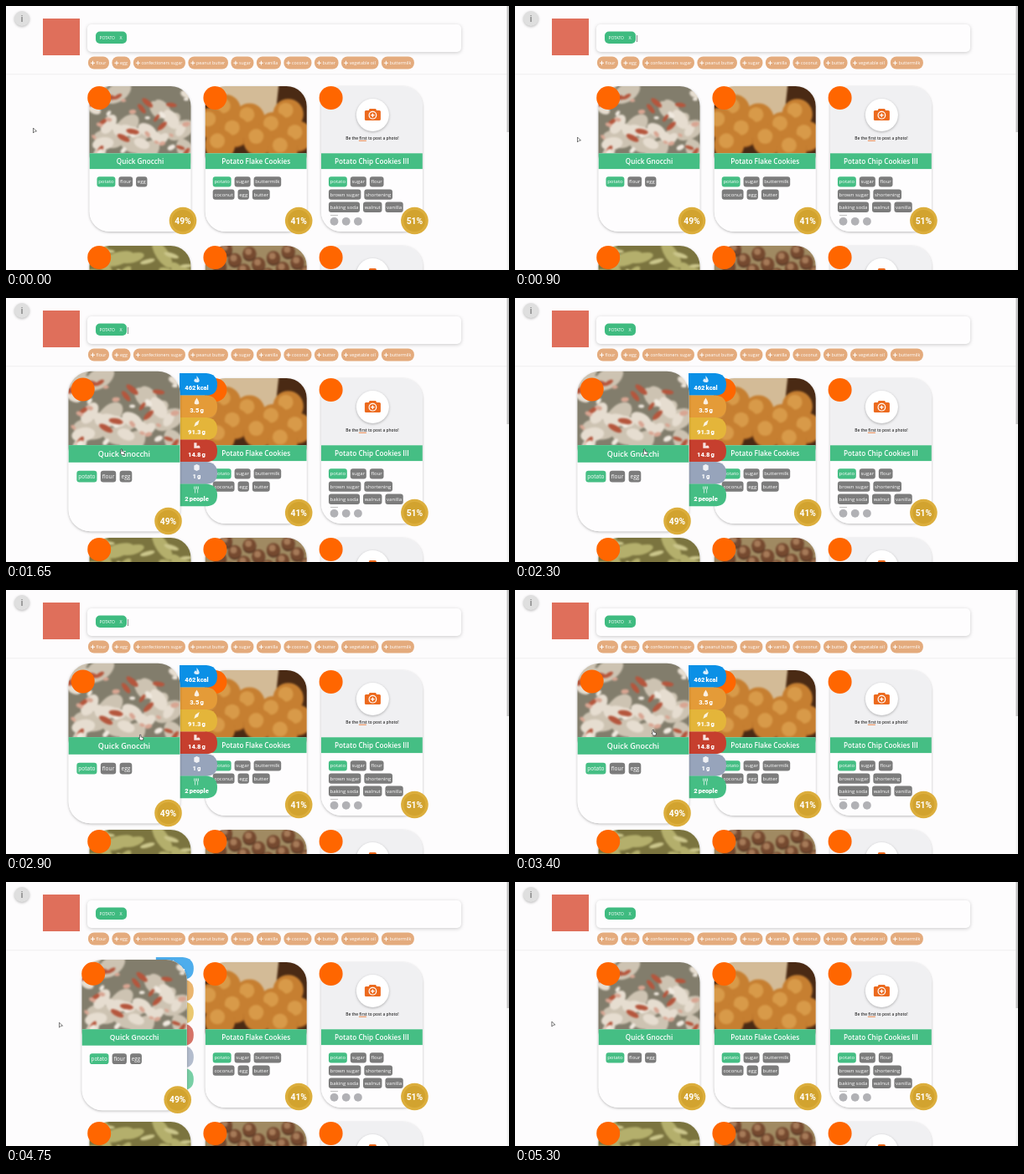
An HTML page for the animation above (5350 ms loop, 600 by 316 pixels).

```html
<!DOCTYPE html>
<html lang="en">
<head>
<meta charset="utf-8">
<title>Recipe finder</title>
<style>
  html, body { margin: 0; width: 100%; height: 100%; overflow: hidden; background: #fdfcfd; }
  svg { display: block; width: 600px; height: 316px; font-family: "Open Sans", "Noto Sans", sans-serif; }
  .shadow { filter: drop-shadow(0 1px 1.5px #0004); }
  .photo { filter: blur(.8px); }
  .heavy { font-family: Roboto, sans-serif; }
</style>
</head>
<body>
<svg id="stage" viewBox="0 0 600 316"></svg>
<script>
const GREEN = '#45be84', PAGE = '#fdfcfd', LOOP = 5350, STEP = 50;
const W = 121, H = 174, PHOTO = 80.3;

const rect = (x, y, w, h, r, fill, more = '') =>
  `<rect x="${x}" y="${y}" width="${w}" height="${h}" rx="${r}" fill="${fill}" ${more}/>`;
const disc = (x, y, r, fill, more = '') =>
  `<circle cx="${x}" cy="${y}" r="${r}" fill="${fill}" ${more}/>`;
const path = (d, fill, more = '') => `<path d="${d}" fill="${fill}" ${more}/>`;
// y is the vertical middle of the line
const text = (x, y, size, str, fill = '#fff', more = '') =>
  `<text x="${x}" y="${y + size * .35}" font-size="${size}" fill="${fill}" text-anchor="middle" ${more}>${str}</text>`;
const group = (x, y, inner, id = '') => `<g transform="translate(${x} ${y})" id="${id}">${inner}</g>`;

const pen = document.createElement('canvas').getContext('2d');
const textWidth = (str, size) => {
  pen.font = '100px "Open Sans", "Noto Sans", sans-serif';
  return pen.measureText(str).width * size / 100;
};
// Lays labels out from left to right; each gets the width of its text plus a margin
const flow = (names, x, gap, size, margin, draw) => names.split(',').map(name => {
  const w = textWidth(name, size) + margin, out = draw(name, x, w);
  x += w + gap;
  return out;
}).join('');

let seed = 1;
const random = () => (seed = seed * 16807 % 2147483647) / 2147483647;

// Scatters soft flattened blobs evenly over the picture below `top`
const scatter = (fill, count, size, flat = .6, top = 0) => Array.from({ length: count }, (_, i) => {
  const x = (i * .618 + .1) % 1 * W, y = top + random() * (PHOTO - top);
  const rx = size * (.7 + random() * .6), turn = random() * 120 - 60;
  return `<ellipse rx="${rx}" ry="${rx * flat}" fill="${fill}" transform="translate(${x} ${y}) rotate(${turn})"/>`;
}).join('');
const balls = (count, r, top, dark, mid, light) => Array.from({ length: count }, (_, i) => {
  const x = (i * .618 + .2) % 1 * W, y = top + i / count * (PHOTO - top);
  return disc(x, y + 1.5, r, dark) + disc(x, y, r, mid) + disc(x - r / 6, y - r / 4, r * .5, light);
}).join('');

const backdrop = fill => rect(-5, -5, W + 10, PHOTO + 10, 0, fill);
const photo = (start, draw) => {
  seed = start;
  return `<g class="photo">${draw()}</g>`;
};
const gnocchi = photo(77, () => backdrop('#827d6c') + scatter('#cdc3b2', 16, 16) + scatter('#e6ddd0', 14, 10) +
  scatter('#b5563d', 14, 7, .4, 12) + scatter('#d8a592', 10, 4) + scatter('#f0e9df', 8, 4));
const cookies = photo(5, () => backdrop('#4a2a14') + path('M12-5H88L82 50H24Z', '#d3bb97') +
  balls(10, 18, 28, '#95551e', '#c67f31', '#d89a49'));
const pasta = photo(9, () => backdrop('#7b743f') + scatter('#b4af6c', 14, 16, .4) + scatter('#cbc68b', 10, 9, .3));
const meatballs = photo(3, () => backdrop('#a08a62') + balls(30, 8, 4, '#4f3020', '#75492f', '#a67a58'));
const noPhoto = backdrop('#f0f0f2') + disc(61.5, 34.5, 19.5, '#fff', 'class="shadow"') +
  rect(52, 29, 19, 12, 1.5, '#ec6a1e') + rect(57, 27, 9, 5, 1.5, '#ec6a1e') +
  disc(61.5, 34.7, 4.3, 'none', 'stroke="#fff" stroke-width="1.2"') +
  path('M59.2 34.7h4.6m-2.3-2.3v4.6', 'none', 'stroke="#fff" stroke-width="1.3"') +
  text(61, 62, 4.8, 'Be the first to post a photo!', '#333', 'font-weight="600"') +
  rect(45, 64.8, 9, .8, 0, '#ec6a1e');

const tagRows = rows => rows.map((names, i) => flow(names, 9, 4, 6, 3.4, (name, x, w) => {
  const y = 108.2 + i * 15.2;
  return rect(x, y, w, 12.4, 3, name === 'potato' ? GREEN : '#7c7c7c') + text(x + w / 2, y + 6, 6, name);
})).join('');

const card = (picture, title, rows) => rect(0, 0, W, H, 24, '#fefdfe', 'class="shadow"') +
  `<g clip-path="url(#round)">${picture}` + rect(0, PHOTO, W, H, 0, '#fefdfe') +
  rect(0, PHOTO, W, 18.8, 0, GREEN) + '</g>' +
  text(W / 2, 90.2, 8.2, title, '#fff', 'font-weight="600"') + tagRows(rows);
const logo = disc(0, 0, 14, '#ff6600');
const badge = label => disc(0, 0, 16.3, '#dcae3c') + disc(0, 0, 13, '#d2a32f') +
  text(0, 0, 10.3, label, '#fff', 'class="heavy" font-weight="700"');

const recipes = [
  [gnocchi, 'Quick Gnocchi', ['potato,flour,egg'], '49%'],
  [cookies, 'Potato Flake Cookies', ['potato,sugar,buttermilk', 'coconut,egg,butter'], '41%'],
  [noPhoto, 'Potato Chip Cookies III',
    ['potato,sugar,flour', 'brown sugar,shortening', 'baking soda,walnut,vanilla'], '51%'],
  [pasta, '', [], ''], [meatballs, '', [], ''], [noPhoto, '', [], '']];

const tile = ([picture, title, rows, share], i) => {
  const x = i % 3 * 138.2, y = i > 2 ? 191 : 0, id = name => i ? '' : name;
  return group(0, 0, group(99.5 + x, 96 + y, card(picture, title, rows)), id('card')) +
    group(111.2 + x, 110 + y, logo, id('logo')) + group(211 + x, 257 + y, badge(share), id('badge'));
};
const moreTags = rect(387, 250, 9, .7, 0, '#aaa') +
  [0, 1, 2].map(i => disc(391.5 + i * 14.2, 257.8, 4.9, '#b1b1b5')).join('');

const suggestions = 'flour,egg,confectioners sugar,peanut butter,sugar,vanilla,coconut,butter,vegetable oil,buttermilk';
const header = rect(0, 0, 600, 81, 0, PAGE, 'style="filter:drop-shadow(0 .5px 1px #0002)"') +
  disc(19, 15, 9, '#dfdfdf', 'class="shadow"') + text(19, 15, 10, 'i', '#444') +
  rect(44, 15, 44, 44, 0, '#df6f5b') +
  rect(97, 22, 446, 33, 5, '#fefdfe', 'style="filter:drop-shadow(0 1px 2px #0003)"') +
  rect(107, 30.5, 37, 14.5, 5, '#3fbb80') + text(120.7, 37.8, 5, 'POTATO') + text(137, 37.8, 5.4, 'X') +
  flow(suggestions, 98, 3.5, 5.3, 13.2, (name, x, w) => rect(x, 60.5, w, 15, 7, '#e4ab7d') +
    path(`M${x + 3} 68.2h5m-2.5-2.5v5`, 'none', 'stroke="#fff" stroke-width="1"') +
    text(x + w / 2 + 3, 67.9, 5.3, name));

// Nutrition tabs: colour, label, icon drawn around 0,0
const tabs = [
  ['#0b90e6', '462 kcal', 'M0-5Q8 5 0 5Q-7 4-2-1L0 1Z'],
  ['#e49b38', '3.5 g', 'M0-5Q7 5 0 5Q-7 5 0-5Z'],
  ['#e4b53a', '91.3 g', 'M-4 5L-2-1L4-5L2 2Z'],
  ['#c63f2e', '14.8 g', 'M-4-4H0V1Q5-2 5 4H-4Z'],
  ['#97a4bb', '1 g', 'M0-5L4-3V3L0 5L-4 3V-3Z'],
  [GREEN, '2 people', 'M-3-5h1V5h-1ZM1-5h1V5h-1ZM-4-5h3v4h-3ZM0-5h3v4h-3Z']];
const panel = tabs.map(([fill, label, icon], i) => group(207, 90 + i * 26.5,
  path('M0 0H32Q45 1 45 13.500Q45 26 33 26.700H0Z', fill) +
  group(20.5, 7, path(icon, '#fff', 'fill-rule="evenodd" opacity=".85" transform="scale(.8)"')) +
  text(20.500, 17.8, 7.6, label, '#fff', 'class="heavy" font-weight="900" word-spacing="-.8"'))).join('');

const outline = 'stroke="#222" stroke-width=".6"';
const [first, ...others] = recipes.map(tile);
const stage = document.getElementById('stage');
stage.innerHTML = `<clipPath id="round">${rect(0, 0, W, H, 24, '#000')}</clipPath>` +
  header + rect(597.5, 0, 2.5, 316, 0, '#f1f1f1') + rect(597.5, 0, 2.5, 151, 0, '#c1c1c1') +
  others.join('') + moreTags + group(0, 0, panel, 'panel') + first +
  rect(145, 35, .7, 8, 0, '#555', 'id="caret"') +
  group(0, 0, path('M0 0V6L2 4H4Z', '#fff', outline), 'arrow') +
  group(0, 0, path('M0 0H1.5V2.500L4.500 3.500L4 6.500H1L-1 4H0Z', '#fff', outline), 'hand');

const part = Object.fromEntries(['card', 'logo', 'badge', 'panel', 'caret', 'arrow', 'hand']
  .map(id => [id, document.getElementById(id)]));
const place = (e, x, y, more = '') => e.setAttribute('transform', `translate(${x} ${y}) ${more}`);
const show = (e, alpha) => e.setAttribute('opacity', +alpha);
const mix = (a, b, k) => a + (b - a) * k;
const smooth = u => u * u * (3 - 2 * u);
const ease = (t, start) => 1 - (1 - Math.min(1, Math.max(0, (t - start) / 250))) ** 2;

const ENTER = 1350, LEAVE = 4650;
// Pointer tip: time, x, y
const route = [[0, 32.5, 146], [900, 74.5, 157], [1150, 71, 158], [1650, 137, 181], [2300, 153.5, 181],
  [3400, 164, 167.5], [4200, 115.5, 169], [4950, 52.5, 168], [LOOP, 43.5, 167]];

function draw(t) {
  const k = ease(t, ENTER) - ease(t, LEAVE);
  place(part.card, 160 - 19 * k, 183 + .5 * k, `scale(${1 + .1 * k}) translate(-160 -183)`);
  place(part.logo, 111.2 - 19.5 * k, 110 - .5 * k);
  place(part.badge, 211 - 17.5 * k, 257 + 10 * k);
  place(part.panel, -44 * (1 - k), 0);
  show(part.panel, Math.min(1, k * 2));

  const i = route.findIndex(p => p[0] > t), [t0, x0, y0] = route[i - 1], [t1, x1, y1] = route[i];
  const u = smooth((t - t0) / (t1 - t0)), over = t >= ENTER && t < LEAVE;
  for (const e of [part.arrow, part.hand]) place(e, mix(x0, x1, u), mix(y0, y1, u));
  show(part.arrow, !over);
  show(part.hand, over);
  show(part.caret, t % 1060 >= 530);
}

const begin = performance.now();
(function tick() {
  const t = (performance.now() - begin) % LOOP;
  draw(Math.floor(t / STEP) * STEP);
  requestAnimationFrame(tick);
})();
</script>
</body>
</html>
```
